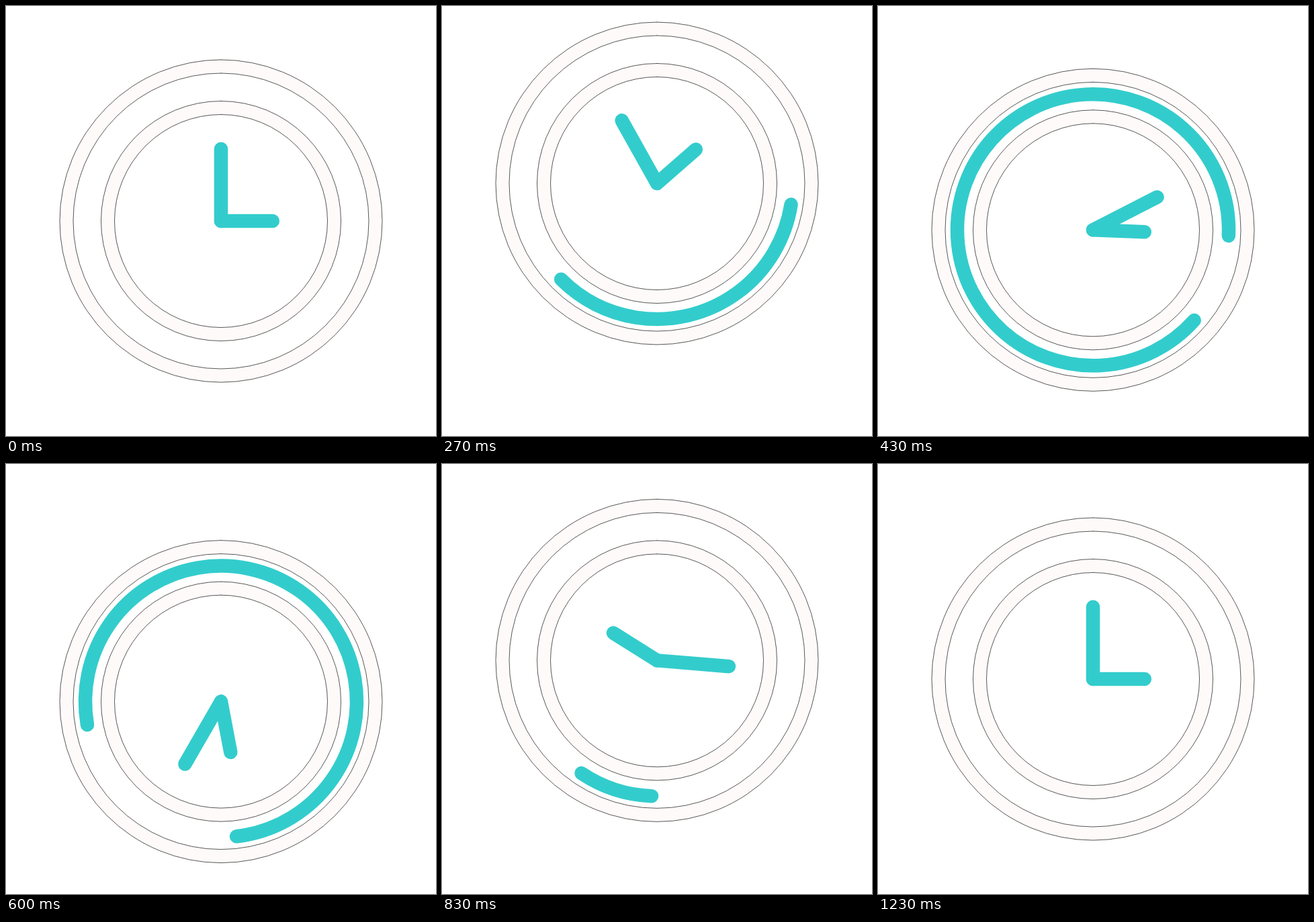
An HTML page with a canvas for the animation above (1.67 s loop, 640x640 px).

```html
<!DOCTYPE html>
<html>
<head>
<meta charset="utf-8">
<style>
html, body { margin: 0; overflow: hidden; background: #fff; }
canvas { display: block; }
</style>
</head>
<body>
<canvas id="stage" width="640" height="640"></canvas>
<script>
const ctx = document.getElementById('stage').getContext('2d');
const LOOP = 1670, TEAL = '#33cccc', RAD = Math.PI / 180;
const clamp = v => Math.min(1, Math.max(0, v));

// Cubic easing curve with its x solved by bisection
function bezier(x1, y1, x2, y2) {
  const curve = (a, b, s) => 3 * a * s * (1 - s) ** 2 + 3 * b * s * s * (1 - s) + s ** 3;
  return x => {
    if (x <= 0 || x >= 1) return clamp(x);
    let lo = 0, hi = 1;
    for (let i = 0; i < 30; i++) {
      const mid = (lo + hi) / 2;
      if (curve(x1, x2, mid) < x) lo = mid; else hi = mid;
    }
    return curve(y1, y2, lo);
  };
}

const easeInOut = bezier(.42, 0, .58, 1);
const minuteEase = bezier(.36, -.38, .705, 1);
const hourEase = bezier(.35, -.575, .706, 1);
const tween = (n, start, end, from, to, ease = easeInOut) =>
  from + (to - from) * ease(clamp((n - start) / (end - start)));

// Bounce of the whole clock: [tick, offset]
const bounce = [[0, 0], [8, -56], [16, 42], [24.3, -28], [32.8, 0]];
function bounceAt(n) {
  const i = bounce.findIndex(([tick]) => tick > n);
  if (i < 0) return 0;
  const [start, from] = bounce[i - 1], [end, to] = bounce[i];
  return tween(n, start, end, from, to);
}

function arc(radius, width, color, from = 0, to = 360) {
  ctx.beginPath();
  ctx.arc(0, 0, radius, (from - 90) * RAD, (to - 90) * RAD);
  ctx.lineWidth = width;
  ctx.strokeStyle = color;
  ctx.stroke();
}

function ring(inner, outer) {
  arc((inner + outer) / 2, outer - inner, '#fffafa');
  arc(inner, .7, '#111');
  arc(outer, .7, '#111');
}

function hand(length, angle) {
  ctx.beginPath();
  ctx.moveTo(0, 0);
  ctx.lineTo(length * Math.sin(angle * RAD), -length * Math.cos(angle * RAD));
  ctx.lineWidth = 20.5;
  ctx.strokeStyle = TEAL;
  ctx.stroke();
}

function draw(n) {
  ctx.setTransform(1, 0, 0, 1, 0, 0);
  ctx.fillStyle = '#fff';
  ctx.fillRect(0, 0, 640, 640);
  ctx.translate(320, 320 + bounceAt(n));
  ctx.lineCap = 'round';

  ring(220, 240);
  ring(158.5, 178.5);

  const turn = tween(n, 1.9, 29.1, 85, 220);
  const head = tween(n, 2.27, 16.2, 0, 360);
  const tail = tween(n, 12.75, 28.2, 0, 360);
  if (head > tail) arc(202, 20.5, TEAL, turn + tail, turn + head);

  hand(107.3, tween(n, 0, 37, 0, 720, minuteEase));
  hand(76.8, tween(n, 0, 37, 90, 450, hourEase));
}

// Motion advances in 30 ticks per second
function play(now) {
  draw(Math.floor((now % LOOP) * .03 + .11));
  requestAnimationFrame(() => play(performance.now()));
}
play(performance.now());
</script>
</body>
</html>
```
